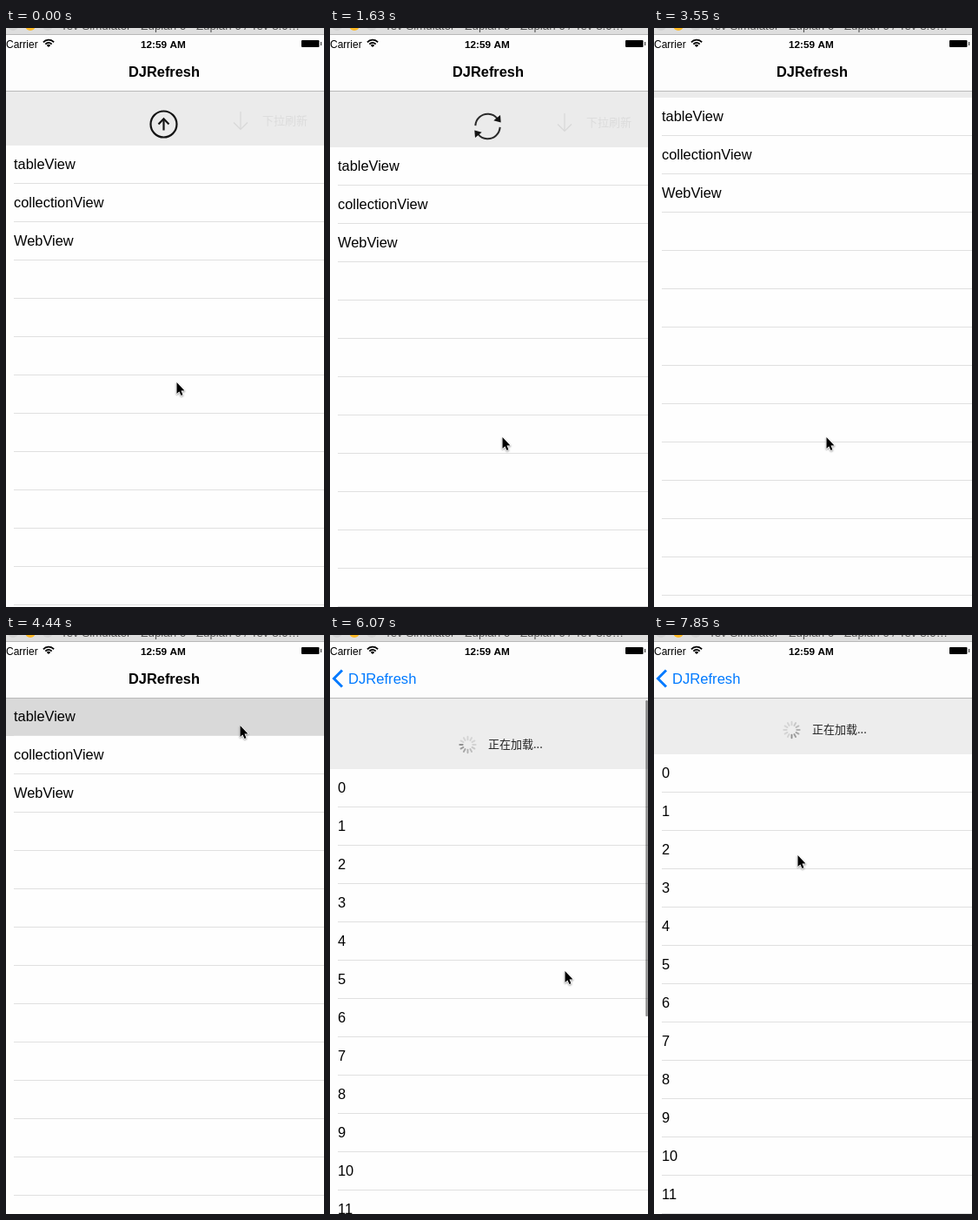
An HTML page with a canvas that plays this animation: 366x665 px, repeating every 7990 ms.

```html
<!DOCTYPE html>
<html lang="en">
<head>
<meta charset="utf-8">
<title>DJRefresh</title>
<style>
  html, body { margin: 0; width: 366px; height: 665px; overflow: hidden; background: #fff; }
  canvas { display: block; }
</style>
</head>
<body>
<canvas id="stage" width="366" height="665"></canvas>
<script>
const c = document.getElementById('stage').getContext('2d');
const W = 366, H = 665, TOP = 72, ROW = 44;
const LOOP = 7990, STEP = 148, LAST = 53;
const SANS = '"Liberation Sans", Arial, sans-serif';
const CJK = '13px "Noto Sans CJK SC", "Noto Sans CJK", sans-serif';
const BLUE = '#007aff', INK = '#151515';
const MENU = ['tableView', 'collectionView', 'WebView'];
const NUMBERS = Array.from({ length: 14 }, (_, i) => String(i));

const linear = x => x;
const dipIn = x => x * x * (2.7 * x - 1.7);
const easeOut = x => 1 - (1 - x) ** 2;
const easeInOut = x => x < 0.5 ? 4 * x ** 3 : 1 - 4 * (1 - x) ** 3;

// Phases of the story; k counts steps of STEP ms.
function ramp(k, from, to, ease = linear) {
  return ease(Math.min(1, Math.max(0, (k - from) / (to - from))));
}
const phases = k => ({
  drag: ramp(k, 0, 6, dipIn),
  release: ramp(k, 7, 10, easeOut),
  close: ramp(k, 22, 24.9, easeInOut),
  reach: ramp(k, 24, 29, easeInOut),
  push: ramp(k, 31.8, 35.8, x => 1 - (1 - x) ** 3),
  aim: ramp(k, 32, 36),
  drag2: ramp(k, 36, 40, easeInOut),
  release2: ramp(k, 40, 43, easeOut),
  leave: ramp(k, 47, 53, easeInOut)
});

function rect(x, y, w, h, color, radius = 0) {
  c.beginPath();
  c.roundRect(x, y, w, h, radius);
  c.fillStyle = color;
  c.fill();
}

function text(s, x, y, font, color = '#000') {
  c.font = font;
  c.fillStyle = color;
  c.fillText(s, x, y);
}

function stroke(width, color) {
  c.lineWidth = width;
  c.strokeStyle = color;
  c.stroke();
}

function trace(points) {
  c.beginPath();
  points.forEach(([x, y]) => c.lineTo(x, y));
}

function line(points, width, color) {
  trace(points);
  stroke(width, color);
}

function polygon(points, color) {
  trace(points);
  c.fillStyle = color;
  c.fill();
}

function arc(x, y, r, from = 0, to = 2 * Math.PI) {
  c.beginPath();
  c.arc(x, y, r, from, to);
}

function placed(x, y, angle, draw) {
  c.save();
  c.translate(x, y);
  c.rotate(angle);
  draw();
  c.restore();
}

function inHeader(bottom, draw) {
  c.save();
  c.beginPath();
  c.rect(0, TOP, W, bottom - TOP);
  c.clip();
  draw();
  c.restore();
}

function thinArrow(x, y, angle, color) {
  placed(x, y, angle, () => {
    line([[0, -10], [0, 10]], 1.2, color);
    line([[-8, 2.5], [0, 10.5], [8, 2.5]], 1.2, color);
  });
}

function circleArrow(x, y) {
  placed(x, y, 0, () => {
    arc(0, 0, 15);
    stroke(2.2, INK);
    line([[0, 7], [0, -6]], 2.2, INK);
    line([[-6, 0], [0, -6.2], [6, 0]], 2.2, INK);
  });
}

function refreshIcon(x, y, angle) {
  for (const half of [0, Math.PI]) {
    placed(x, y, angle + half, () => {
      arc(0, 0, 14.2, Math.PI * 1.02, Math.PI * 1.78);
      stroke(2, '#2a2a2a');
      polygon([[14.5, -13], [15.2, -4.5], [6.8, -6.7]], INK);
    });
  }
}

function spinner(x, y, t) {
  const head = Math.floor(12 * t / 1000 + 8.5);
  c.lineCap = 'round';
  for (let i = 0; i < 12; i++) {
    const age = (head - i + 12) % 12;
    const shade = Math.min(212, 145 + age * 11);
    placed(x, y, i * Math.PI / 6, () =>
      line([[0, -5.8], [0, -9.2]], 1.9, `rgb(${shade},${shade},${shade})`));
  }
}

function list(labels, pull, selected) {
  const top = TOP + Math.round(pull);
  rect(0, top, W, H - top, '#fefefe');
  if (selected) rect(0, top, W, ROW, '#d9d9d9');
  for (let i = 0, y = top; y < H; i++, y += ROW) {
    rect(9, y + ROW - 1, W - 9, 1, '#e0e0e0');
    if (labels[i]) text(labels[i], 9, y + 27, `16.4px ${SANS}`);
  }
  return top;
}

function menuPage(k, t, p) {
  rect(0, TOP, W, H - TOP, '#ebebeb');
  const top = list(MENU, 63 + 25 * p.drag - 23 * p.release - 65 * p.close, k >= 30);
  inHeader(top, () => {
    if (k < 8) circleArrow(181.5, top - 24.5);
    else refreshIcon(181.5, top - 24, (t - 11 * STEP) / 1000 * 1.2 * Math.PI);
    thinArrow(270, top - 29, 0, '#d8d8d8');
    text('下拉刷新', 295, top - 24.5, CJK, '#dcdcdc');
  });
}

function tablePage(k, t, p) {
  const pull = 103 * p.drag2 - 38 * p.release2;
  const loading = k > 40, ready = pull > 65;
  rect(0, TOP, W, H - TOP, '#ededed');
  const top = list(NUMBERS, pull);
  inHeader(top, () => {
    if (loading) spinner(158.5, top - 28, t);
    else thinArrow(158.5, top - 28, ready ? Math.PI : 0, '#777');
    const label = loading ? '正在加载...' : ready ? '松开刷新' : '下拉刷新';
    text(label, 182, top - 24.5, CJK, '#222');
  });
  c.globalAlpha = ramp(k, 36, 37) - ramp(k, 43, 45);
  rect(363.3, 75, 2.5, 445 - pull, 'rgba(0,0,0,.45)', 1.2);
  c.globalAlpha = 1;
}

function statusBar() {
  rect(0, 0, W, 7, '#dedede');
  rect(0, 7, W, 1, '#b8b8b8');
  for (const i of [0, 1, 2]) {
    arc(8 + 20 * i, -3, 6);
    c.fillStyle = i === 1 ? '#fdb924' : '#d2d2d2';
    c.fill();
  }
  text('Tev Simulator - Zuplan 6 - Zuplan 6 / Tev 8.0…', 63, 2, `13.3px ${SANS}`, '#555');
  text('Carrier', 0, 22.5, `12px ${SANS}`);
  text('12:59 AM', 155, 22.5, `bold 11.8px ${SANS}`);
  for (const r of [1.5, 5, 8.3]) {
    arc(49, 22, r, -Math.PI * 0.76, -Math.PI * 0.24);
    stroke(r < 2 ? 3 : 1.8, '#000');
  }
  rect(340, 14, 20.5, 8, '#000', 1);
  rect(362, 16, 1.2, 4, '#444');
}

function navBar(push) {
  const x = 141 - 120 * push;
  rect(0, 0, W, TOP, '#fdfdfd');
  rect(0, TOP, W, 1, '#b9b9b9');
  c.globalAlpha = 1 - push;
  text('DJRefresh', x, 56, `bold 16.4px ${SANS}`);
  c.globalAlpha = push;
  text('DJRefresh', x, 56, `16.6px ${SANS}`, BLUE);
  line([[14, 40.5], [4.5, 50], [14, 59.5]], 3, BLUE);
  c.globalAlpha = 1;
}

function cursor(p) {
  const x = 197 + 2 * p.drag + 71 * p.reach + 19 * p.aim - 18 * p.drag2 - 105 * p.leave;
  const y = 407 + 63 * p.drag - 366 * p.reach + 76 * p.aim + 206 * p.drag2 - 133 * p.leave;
  placed(Math.round(x) - 0.5, Math.round(y), 0, () => {
    const shape = [[0, 0], [0, 13], [2.9, 10.4], [5, 15], [7, 14.2], [5, 9.6], [9, 9.4], [0, 0]];
    c.shadowColor = 'rgba(0,0,0,.4)';
    c.shadowBlur = 2;
    c.shadowOffsetY = 1;
    c.lineJoin = 'round';
    line(shape, 1.6, '#fff');
    c.shadowColor = 'transparent';
    polygon(shape, '#000');
  });
}

function draw(k) {
  const t = k * STEP, p = phases(k);
  c.lineCap = 'butt';
  if (p.push < 1) placed(Math.round(-110 * p.push), 0, 0, () => menuPage(k, t, p));
  if (p.push > 0) placed(Math.round(W * (1 - p.push)), 0, 0, () => tablePage(k, t, p));
  c.lineCap = 'butt';
  navBar(p.push);
  statusBar();
  cursor(p);
}

// The picture advances in discrete steps, so time is rounded down to one.
function tick() {
  const t = performance.now() % LOOP;
  draw(Math.min(LAST, Math.floor((t + 9) / STEP)));
  requestAnimationFrame(tick);
}
tick();
</script>
</body>
</html>
```
